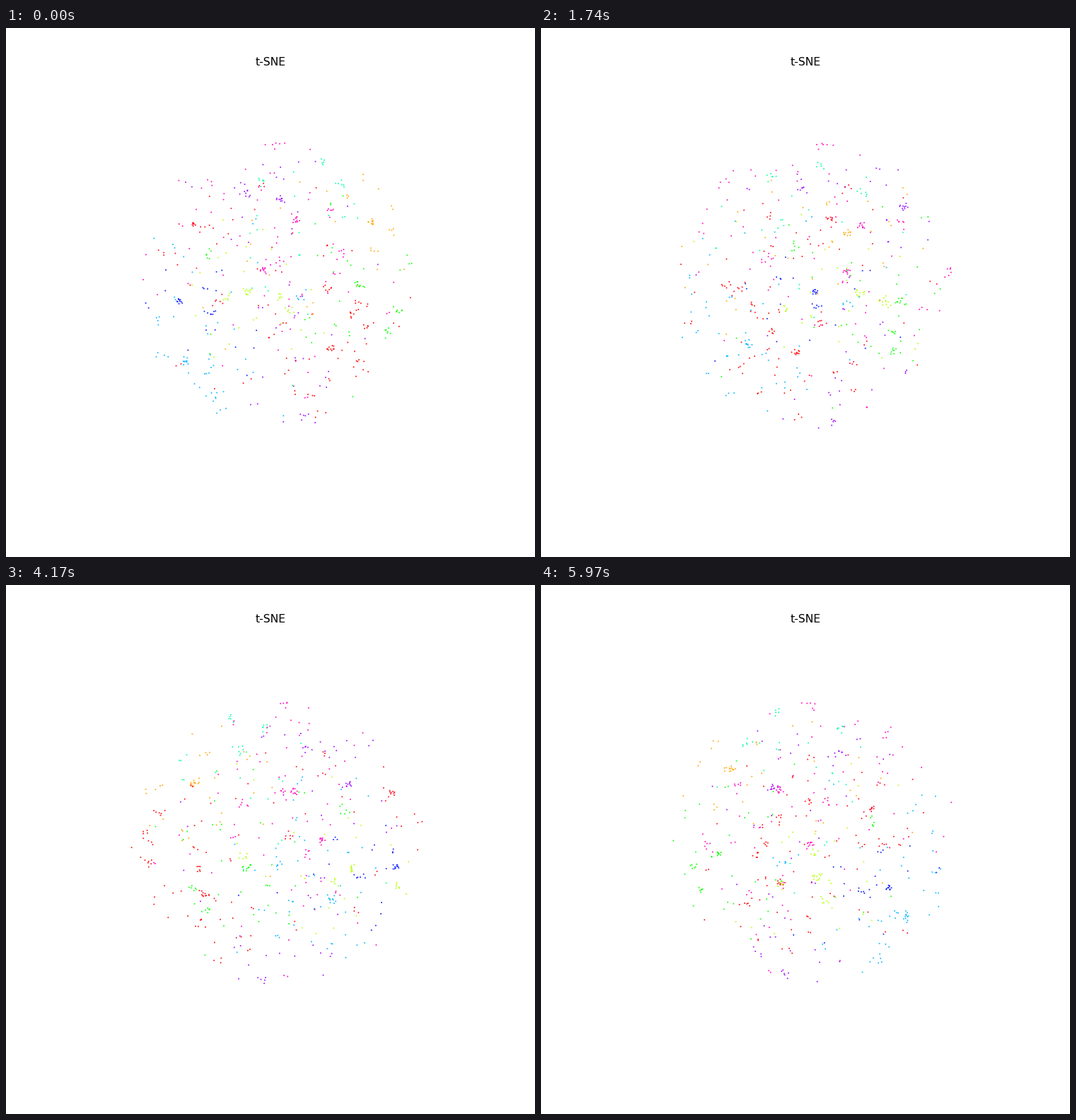
Recreate the animation shown at these times as a matplotlib script. Size 748 by 748 pixels, loop 6000 ms.

```python
import numpy as np
import matplotlib.pyplot as plt
from matplotlib.animation import FuncAnimation

SIZE, DPI = 748, 93.5
FRAMES, INTERVAL = 200, 30
CX, CY = 384.1, 363.9          # screen position of the cloud's centre
RADIUS = 202
CAMERA = 4043                  # viewing distance in pixels
ELEV = np.radians(10)
CLASSES, TOTAL = 10, 580

# The most visible clusters: class, (right, front, up)
KEYS = [
    (0, (76, 72, -76)), (1, (130, 28, 94)), (2, (-45, -107, -29)),
    (3, (116, -70, -13)), (4, (62, 29, 180)), (5, (-130, 29, -105)),
    (6, (-143, -92, -38)), (7, (4, -150, 99)), (7, (38, -8, -192)),
    (8, (24, -67, 85)), (8, (-19, -72, 11)), (8, (-3, -13, 199)),
    (9, (-122, -107, 70)),
]

rng = np.random.default_rng(11)


def random_in_ball(n):
    v = rng.normal(size=(n, 3))
    v /= np.linalg.norm(v, axis=1, keepdims=True)
    return RADIUS * v * np.cbrt(rng.random((n, 1)))


def build_cloud():
    owners = np.array([label for label, _ in KEYS])
    homes = np.array([home for _, home in KEYS], float)
    points, labels = [], []

    def add_clump(centre, label, n, spread):
        points.extend(rng.normal(centre, spread, (n, 3)))
        labels.extend([label] * n)

    for label, home in zip(owners, homes):
        inner = np.linalg.norm(home) < 0.9 * RADIUS
        add_clump(home, label, 10 if inner else 5, 3.6)

    # Spread small clumps evenly, coloured after a key cluster not far away
    step = 0
    while len(points) < TOTAL:
        options = random_in_ball(4)
        gaps = np.linalg.norm(options[:, None] - np.array(points), axis=2)
        centre = options[gaps.min(axis=1).argmax()]
        far = np.linalg.norm(homes - centre, axis=1)
        label = owners[(far - rng.gumbel(0, 45, len(far))).argmin()]
        n = 6 if step % 15 == 0 else min(rng.geometric(0.75), 3)
        add_clump(centre, label, n, 4)
        step += 1
    return np.array(points), np.array(labels)


points, labels = build_cloud()


def project(angle):
    a, b, up = points.T
    c, s = np.cos(angle), np.sin(angle)
    right, front = a * c - b * s, a * s + b * c
    depth = front * np.cos(ELEV) + up * np.sin(ELEV)
    height = up * np.cos(ELEV) - front * np.sin(ELEV)
    zoom = CAMERA / (CAMERA - depth)
    return np.column_stack([CX + right * zoom, CY - height * zoom])


fig = plt.figure(figsize=(SIZE / DPI, SIZE / DPI), dpi=DPI, facecolor="white")
ax = fig.add_axes([0, 0, 1, 1])
ax.set(xlim=(0, SIZE), ylim=(SIZE, 0))
ax.axis("off")
ax.text(SIZE / 2, 53, "t-SNE", ha="center", va="baseline",
        fontsize=12, family="DejaVu Sans", color="black")
dots = ax.scatter(*project(0).T, s=1, marker=".",
                  c=plt.cm.hsv(labels / (CLASSES - 1)))


def update(i):
    dots.set_offsets(project(np.radians(i)))
    return dots,


anim = FuncAnimation(fig, update, frames=FRAMES, interval=INTERVAL,
                     repeat=True, repeat_delay=0)
plt.show()
```
